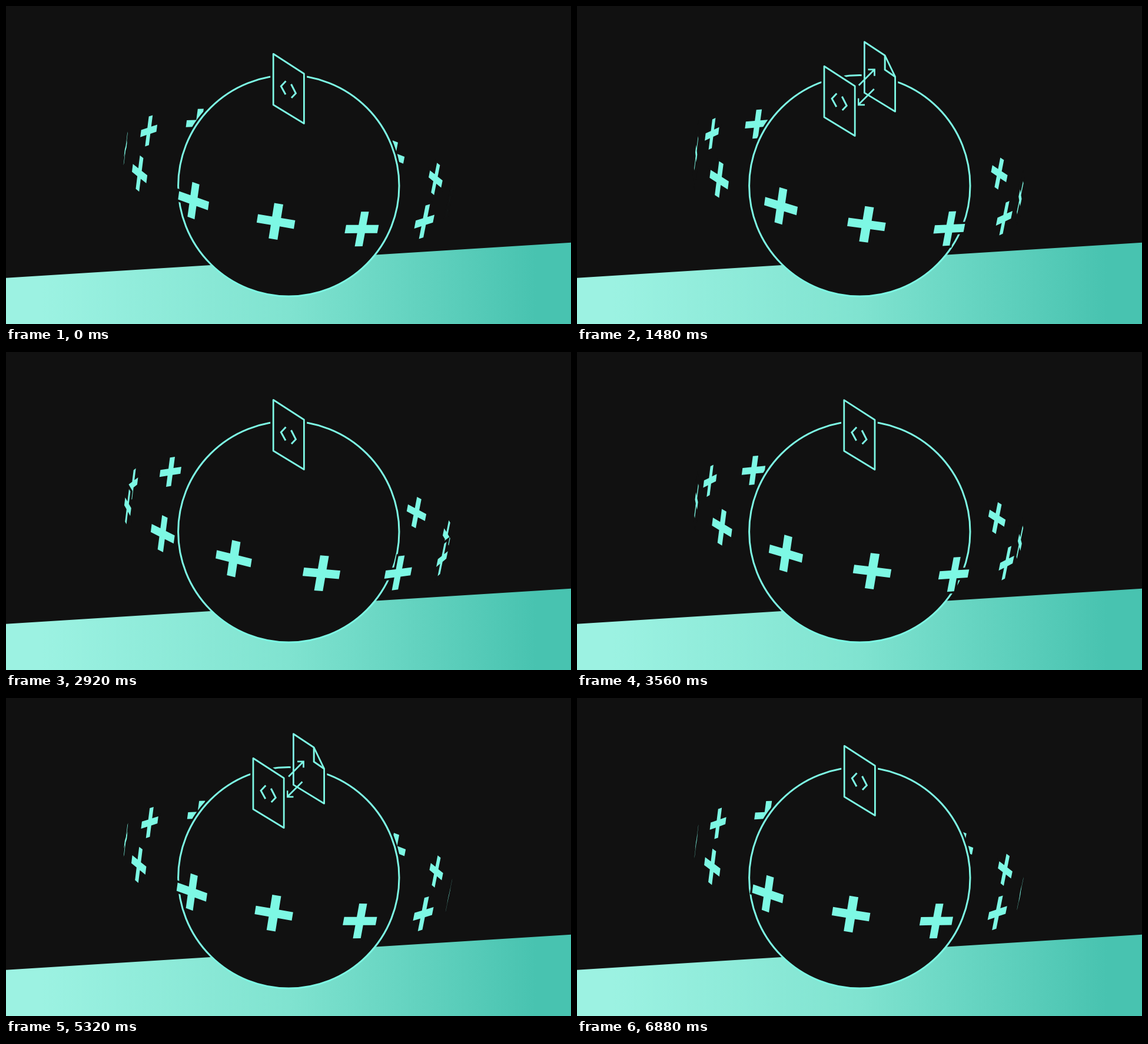
Animation, 960 px wide and 540 px high, one loop 6.92 s. Source, as an HTML page with a canvas:

```html
<!DOCTYPE html>
<html lang="en">
<head>
<meta charset="utf-8">
<title>Orbiting pluses</title>
<style>
  html, body { margin: 0; width: 100%; height: 100%; overflow: hidden; background: #111; }
  canvas { display: block; }
</style>
</head>
<body>
<canvas id="stage" width="960" height="540"></canvas>
<script>
const ctx = document.getElementById('stage').getContext('2d');
const DARK = '#111111', MINT = '#7df8e4';
const LOOP = 6920, CYCLE = LOOP / 2;

// Ring of pluses, seen in perspective
const COUNT = 13, RADIUS = 276.3, DEPTH = 2039;
const PITCH = 16.4 * Math.PI / 180, ROLL = 9.2 * Math.PI / 180;
const STEP = 2 * Math.PI / COUNT, START = -1.15 * Math.PI / 180;
const sinP = Math.sin(PITCH), cosP = Math.cos(PITCH);
const sinR = Math.sin(ROLL), cosR = Math.cos(ROLL);
const ARM = 27.9, HALF = 6.65;
const PLUS = [
  [-HALF, ARM], [HALF, ARM], [HALF, HALF], [ARM, HALF], [ARM, -HALF], [HALF, -HALF],
  [HALF, -ARM], [-HALF, -ARM], [-HALF, -HALF], [-ARM, -HALF], [-ARM, HALF], [-HALF, HALF]
];

// Cards, in their closed position
const CARD = [[454.2, 81.3], [506.4, 115], [506.4, 199.5], [454.2, 167.7]];
const PAGE = [[454.2, 81.3], [489, 104.3], [506.4, 140.5], [506.4, 199.5], [454.2, 167.7]];
const FOLD = [[489, 104.3], [489, 128.5], [506.4, 140.5]];
const LEFT = [[475.5, 127.5], [467.3, 136.2], [475, 150.3]];
const RIGHT = [[484.5, 132.8], [492.4, 148.2], [485, 156]];

const band = ctx.createLinearGradient(60, 0, 900, 0);
band.addColorStop(0, '#9cf2e2');
band.addColorStop(0.5, '#80e3d0');
band.addColorStop(1, '#48c3b0');

const span = (t, a, b) => Math.min(1, Math.max(0, (t - a) / (b - a)));
const inOut = u => u < 0.5 ? 4 * u ** 3 : 1 - 4 * (1 - u) ** 3;
const mix = (a, b, u) => a.map((v, i) => v + (b[i] - v) * u);

function trace(points, closed) {
  ctx.beginPath();
  points.forEach(p => ctx.lineTo(...p));
  if (closed) ctx.closePath();
}

function stroke(color, width) {
  ctx.strokeStyle = color;
  ctx.lineWidth = width;
  ctx.stroke();
}

function fill(color) {
  ctx.fillStyle = color;
  ctx.fill();
}

function project(angle, a, b) {
  const s = Math.sin(angle), c = Math.cos(angle);
  const x = RADIUS * s + a * c;
  const out = RADIUS * c - a * s;
  const scale = DEPTH / (DEPTH - out * cosP - b * sinP);
  const px = x * scale, py = (out * sinP - b * cosP) * scale;
  return [479.5 + px * cosR - py * sinR, 278.5 + px * sinR + py * cosR];
}

function drawPlus(angle) {
  trace(PLUS.map(([a, b]) => project(angle, a, b)), true);
  stroke(DARK, 7);
  fill(MINT);
}

function circle() {
  ctx.beginPath();
  ctx.arc(480.3, 305.3, 187.7, 0, 2 * Math.PI);
}

function drawPanel(outline, details, dx, dy) {
  ctx.save();
  ctx.translate(dx, dy);
  ctx.lineJoin = 'round';
  trace(outline, true);
  stroke(DARK, 9.5);
  fill(DARK);
  stroke(MINT, 2.8);
  ctx.lineJoin = 'miter';
  for (const line of details) {
    trace(line);
    stroke(MINT, 3);
  }
  ctx.restore();
}

function drawArrow(from, to, side, grow, trim) {
  if (grow <= 0 || trim >= 1) return;
  const tip = mix(from, to, grow), tail = mix(from, to, trim);
  const arm = 11 * Math.sqrt(grow) * (1 - trim) * side;
  ctx.beginPath();
  ctx.moveTo(...tail);
  ctx.lineTo(...tip);
  ctx.moveTo(tip[0] - arm, tip[1]);
  ctx.lineTo(...tip);
  ctx.lineTo(tip[0], tip[1] + arm);
  stroke(MINT, 2.8);
}

function draw(t) {
  const beat = t % CYCLE;
  // The ring skips slightly ahead halfway through the loop
  const turned = COUNT * t / LOOP + (t < CYCLE ? 0 : 0.029);
  const angles = Array.from({ length: COUNT }, (_, i) => START + (i - turned) * STEP)
    .sort((a, b) => Math.cos(a) - Math.cos(b));

  ctx.fillStyle = DARK;
  ctx.fillRect(0, 0, 960, 540);

  angles.filter(a => Math.cos(a) < 0).forEach(drawPlus);
  circle();
  stroke(DARK, 9);
  trace([[0, 461.7], [960, 401.7], [960, 540], [0, 540]], true);
  fill(band);
  circle();
  fill(DARK);
  stroke(MINT, 3);
  angles.filter(a => Math.cos(a) >= 0).forEach(drawPlus);

  const open = inOut(span(beat, 0, 700)) - inOut(span(beat, 2130, 2840));
  const grow = 1 - (1 - span(beat, 190, 1520)) ** 3;
  const trim = span(beat, 1635, 2247) ** 3;
  drawPanel(PAGE, [FOLD], 34.2 * open, -20.3 * open);
  drawArrow([478.8, 134.8], [505.5, 107.8], 1, grow, trim);
  drawArrow([504.8, 141], [478, 167.8], -1, grow, trim);
  drawPanel(CARD, [LEFT, RIGHT], -34.2 * open, 21 * open);
}

const began = performance.now();
function tick() {
  draw((performance.now() - began) % LOOP);
  requestAnimationFrame(tick);
}
tick();
</script>
</body>
</html>
```
